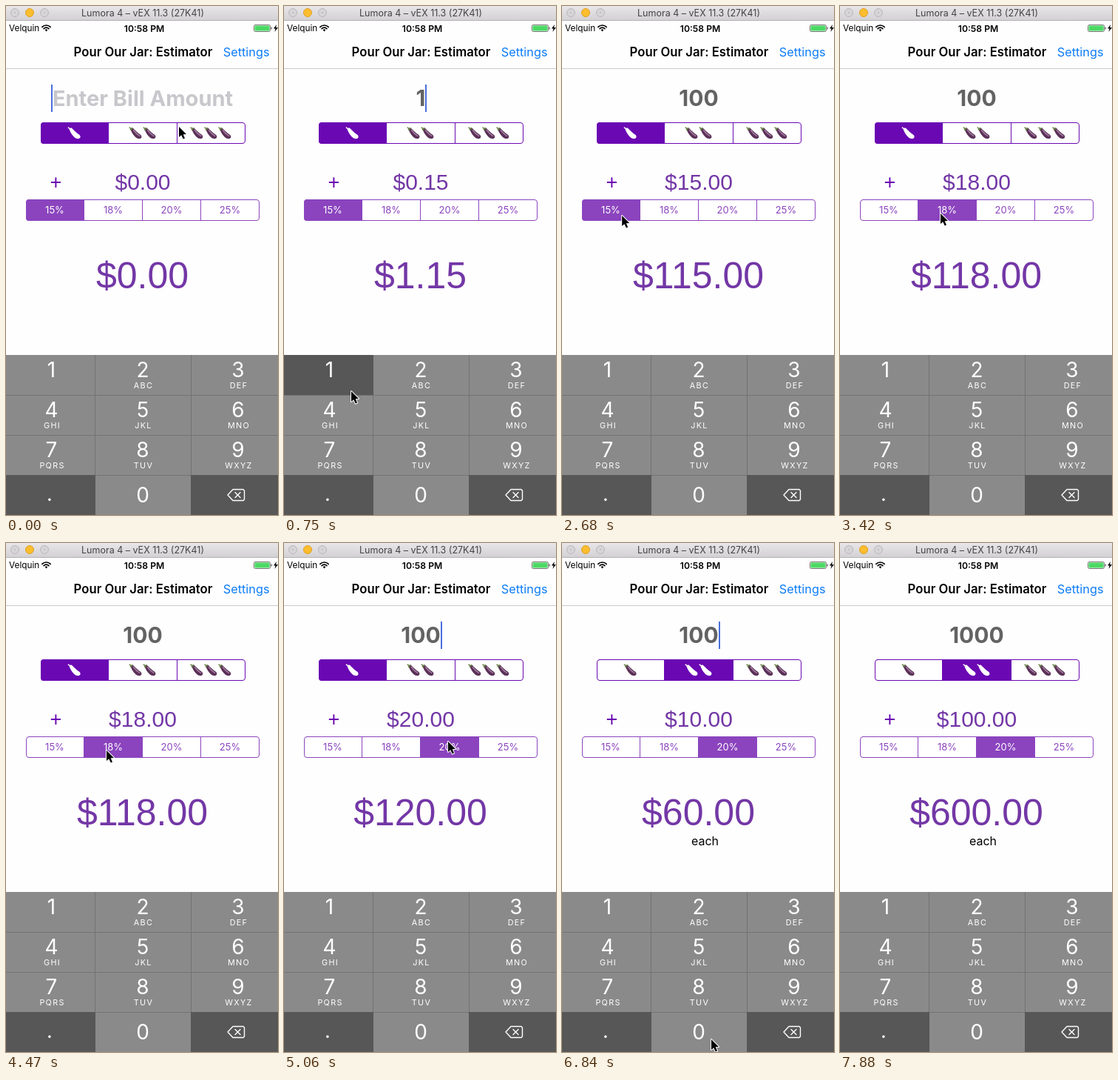
An HTML page with a canvas that plays this animation: 368 px wide and 687 px high, repeating every 8000 ms.

```html
<!DOCTYPE html>
<html lang="en">
<head>
<meta charset="utf-8">
<title>Tip calculator</title>
<style>
html, body { margin: 0; width: 100%; height: 100%; overflow: hidden; background: #fff; }
canvas { display: block; width: 368px; height: 687px; }
</style>
</head>
<body>
<canvas id="stage"></canvas>
<script>
const W = 368, H = 687, LOOP = 8000, STEP = 148.6;
const UI = 'Inter, "Open Sans", sans-serif';
const SANS = '"Liberation Sans", Arial, sans-serif';
const DEEP = '#6a08b3', VIOLET = '#8b44be', AMOUNT = '#7337a6';
const canvas = document.getElementById('stage');
const ctx = canvas.getContext('2d');
const dpr = window.devicePixelRatio || 1;
canvas.width = W * dpr;
canvas.height = H * dpr;

// Pointer stops: [tick, x, y]
const PATH = [
  [0, 234, 163], [4, 91, 520], [6, 91, 520], [8, 173, 664], [9, 175, 652],
  [11, 175, 652], [15, 59, 320], [17, 62, 284], [20, 136, 280], [30, 136, 280],
  [33, 222, 268], [35, 222, 268], [37, 188, 168], [42, 188, 168], [45, 202, 670]
];
const BILLS = [[0, 0], [5, 1], [9, 10], [10, 100], [47, 1000]];
const RATES = [15, 18, 20, 25];
const PRESSES = [[5, 5, '1'], [9, 10, '0'], [47, 48, '0']];

function latest(list, n) {
  let value = list[0][1];
  for (const [at, v] of list) if (n >= at) value = v;
  return value;
}

function pointerAt(n) {
  for (let i = 1; i < PATH.length; i++) {
    const [a, ax, ay] = PATH[i - 1], [b, bx, by] = PATH[i];
    if (n <= b) {
      const u = (n - a) / (b - a), e = u * u * (3 - 2 * u);
      return [ax + (bx - ax) * e, ay + (by - ay) * e];
    }
  }
  return PATH[PATH.length - 1].slice(1);
}

function caretOn(n) {
  if (n >= 52) return false;
  if (n < 14) return n < 2 || n > 3;
  if (n >= 47) return true;
  return (n - 22.3 + 65) % 6.5 >= 3.2;
}

function rect(x, y, w, h, color) {
  ctx.fillStyle = color;
  ctx.fillRect(x, y, w, h);
}

function text(s, x, y, size, color, weight = 400, family = UI, align = 'center') {
  ctx.font = `${weight} ${size}px ${family}`;
  ctx.textAlign = align;
  ctx.fillStyle = color;
  ctx.fillText(s, x, y);
}

function poly(points, close = true) {
  ctx.beginPath();
  points.forEach(([x, y], i) => i ? ctx.lineTo(x, y) : ctx.moveTo(x, y));
  if (close) ctx.closePath();
}

function at(x, y, draw) {
  ctx.save();
  ctx.translate(x, y);
  draw();
  ctx.restore();
}

function titleBar() {
  const g = ctx.createLinearGradient(0, 0, 0, 19);
  g.addColorStop(0, '#e8e6e8');
  g.addColorStop(1, '#d3d1d3');
  rect(0, 0, W, 19, g);
  rect(0, 19, W, 1, '#b4b2b4');
  [['#d7d5d7', '#b9b7b9'], ['#fcbd2e', '#dfa023'], ['#d7d5d7', '#b9b7b9']].forEach(([fill, edge], i) => {
    ctx.beginPath();
    ctx.arc(12 + i * 20, 9, 5.5, 0, 7);
    ctx.fillStyle = fill;
    ctx.fill();
    ctx.lineWidth = 1;
    ctx.strokeStyle = edge;
    ctx.stroke();
    if (i !== 1) rect(11 + i * 20, 8, 2, 2, '#c2c0c2');
  });
  text('Lumora 4 – vEX 11.3 (27K41)', 185, 14, 12.5, '#444');
}

function statusBar() {
  text('Velquin', 4, 34, 11.8, '#000', 400, UI, 'left');
  text('10:58 PM', 187, 34.5, 12.2, '#000', 600);
  ctx.strokeStyle = '#000';
  ctx.lineWidth = 1.7;
  for (const r of [8, 4.8]) {
    ctx.beginPath();
    ctx.arc(54.5, 34, r, -Math.PI * 0.75, -Math.PI * 0.25);
    ctx.stroke();
  }
  ctx.beginPath();
  ctx.moveTo(54.5, 34.5);
  ctx.arc(54.5, 34, 2.5, -Math.PI * 0.75, -Math.PI * 0.25);
  ctx.fillStyle = '#000';
  ctx.fill();

  ctx.lineWidth = 1;
  ctx.beginPath();
  ctx.roundRect(335.5, 25.5, 22, 9, 1.8);
  ctx.strokeStyle = '#777';
  ctx.stroke();
  rect(336.5, 26.5, 20, 7, '#4cd964');
  rect(358.5, 28.5, 1.5, 3, '#777');
  poly([[366, 25], [362, 30.6], [364.6, 30.6], [363.4, 35], [368, 29], [365.2, 29]]);
  ctx.fillStyle = '#000';
  ctx.fill();
}

function navBar() {
  rect(0, 20, W, 64, '#fefefe');
  rect(0, 84, W, 1, '#cbcbcb');
  statusBar();
  text('Pour Our Jar: Estimator', 185.5, 68, 16.7, '#000', 600);
  text('Settings', 356.5, 68, 16.3, '#0c7cf8', 400, UI, 'right');
}

function segments(x, y, w, h, count, chosen, color, label) {
  const cell = w / count;
  ctx.save();
  ctx.beginPath();
  ctx.roundRect(x, y, w, h, 4);
  ctx.clip();
  rect(x, y, w, h, '#fff');
  rect(Math.round(x + chosen * cell), y, Math.round(cell), h, color);
  for (let i = 1; i < count; i++) rect(Math.round(x + i * cell) - 1, y, 1, h, color);
  ctx.restore();
  ctx.beginPath();
  ctx.roundRect(x + 0.5, y + 0.5, w - 1, h - 1, 3.5);
  ctx.lineWidth = 1;
  ctx.strokeStyle = color;
  ctx.stroke();
  for (let i = 0; i < count; i++) label(i, x + (i + 0.5) * cell, i === chosen);
}

function eggplant(x, y, white) {
  at(x, y, () => {
    ctx.beginPath();
    ctx.moveTo(-6.4, -4.6);
    ctx.bezierCurveTo(-4.5, 0, -0.5, 7, 4.8, 7.6);
    ctx.bezierCurveTo(8.6, 8, 9.6, 4.2, 7, 2.2);
    ctx.bezierCurveTo(3, 0, 0, -4, -3, -6.6);
    ctx.bezierCurveTo(-5, -7.6, -6.8, -6.4, -6.4, -4.6);
    ctx.fillStyle = white ? '#fff' : '#5b3157';
    ctx.fill();
    ctx.lineCap = 'round';
    if (!white) {
      ctx.beginPath();
      ctx.moveTo(-2.5, -4);
      ctx.quadraticCurveTo(1, 1, 6, 4);
      ctx.lineWidth = 1.4;
      ctx.strokeStyle = '#a57fa2';
      ctx.stroke();
      poly([[-7, -6.6], [-3.4, -7.2], [-3.4, -5.2], [-4.8, -5.2], [-5.8, -3], [-7, -4.2]]);
      ctx.fillStyle = '#678044';
      ctx.fill();
    }
    poly([[-6, -6], [-7.8, -7.4]], false);
    ctx.lineWidth = 1.5;
    ctx.strokeStyle = white ? '#fff' : '#678044';
    ctx.stroke();
  });
}

function billField(bill, n) {
  if (bill) text(bill, 185, 135, 30, '#636363', 700);
  else text('Enter Bill Amount', 185, 135, 29, '#c7c7cc', 700);
  if (caretOn(n)) {
    const x = bill ? 185 + ctx.measureText(bill).width / 2 : 61;
    rect(Math.round(x), 106, 2, 37, '#4a6fdc');
  }
}

function deleteIcon() {
  ctx.strokeStyle = '#fff';
  ctx.lineWidth = 1.4;
  ctx.lineJoin = ctx.lineCap = 'round';
  poly([[300, 660], [307, 652.5], [321, 652.5], [322.5, 654], [322.5, 666], [321, 667.5], [307, 667.5]]);
  ctx.stroke();
  poly([[310, 656.5], [317, 663.5]], false);
  ctx.stroke();
  poly([[317, 656.5], [310, 663.5]], false);
  ctx.stroke();
}

function keypad(n) {
  const keys = '1 2 3 4 5 6 7 8 9 . 0 <'.split(' ');
  const letters = ['', 'ABC', 'DEF', 'GHI', 'JKL', 'MNO', 'PQRS', 'TUV', 'WXYZ'];
  const edges = [0, 120, 250, W], mids = [61.5, 185, 314];
  const press = PRESSES.find(([a, b]) => n >= a && n <= b);
  rect(0, 471, W, 216, '#8a8a8a');
  for (const x of [120, 250]) rect(x, 471, 1, 216, '#737373');
  for (const y of [525, 579, 633]) rect(0, y, W, 1, '#737373');
  keys.forEach((key, i) => {
    const c = i % 3, x = mids[c], y = 471 + Math.floor(i / 3) * 54;
    if (key === '.' || key === '<' || (press && press[2] === key)) {
      rect(edges[c], y, edges[c + 1] - edges[c] + (c ? 0 : 1), 54, '#575757');
    }
    if (key === '<') deleteIcon();
    else if (key === '.') text('.', 59, 668, 27, '#fff');
    else text(key, x, key === '0' ? 670 : y + 30, 28, '#fff', 400);
    if (letters[i]) {
      ctx.letterSpacing = '1.3px';
      text(letters[i], x + 1, y + 45, 10.8, '#fff');
      ctx.letterSpacing = '0px';
    }
  });
}

function pointer(x, y) {
  at(x, y, () => {
    poly([[0, 0], [0, 14], [3.2, 11.2], [5.7, 16.6], [8, 15.6], [5.7, 10.3], [10, 10]]);
    ctx.lineJoin = 'round';
    ctx.lineWidth = 2;
    ctx.strokeStyle = '#fff';
    ctx.stroke();
    ctx.fillStyle = '#000';
    ctx.fill();
  });
}

function draw(t) {
  const n = Math.floor(t / STEP);
  const bill = latest(BILLS, n);
  const rate = n >= 33 ? 2 : n >= 21 ? 1 : 0;
  const people = n >= 38 ? 2 : 1;
  const tip = bill * RATES[rate] / 100;
  const money = v => '$' + (v / people).toFixed(2);

  ctx.setTransform(dpr, 0, 0, dpr, 0, 0);
  rect(0, 0, W, H, '#fefefe');
  titleBar();
  navBar();
  billField(bill, n);
  segments(47, 157, 277, 29, 3, people - 1, DEEP, (i, x, on) => {
    for (let k = 0; k <= i; k++) eggplant(x - 1 + (k - i / 2) * 19, 171.5, on);
  });
  text('+', 67.5, 247, 27, DEEP, 400, SANS);
  text(money(tip), 185, 247.5, 30, AMOUNT, 400, SANS);
  segments(27, 261, 316, 29, 4, rate, VIOLET, (i, x, on) => {
    text(RATES[i] + '%', x - 0.5, 280, 13, on ? '#fff' : VIOLET);
  });
  text(money(bill + tip), 184.5, 381, 50, AMOUNT, 400, SANS);
  if (people > 1) text('each', 193.5, 408, 16, '#000');
  keypad(n);
  if (n < 53) pointer(...pointerAt(n));
}

const start = performance.now();
function frame() {
  draw((performance.now() - start) % LOOP);
  requestAnimationFrame(frame);
}
frame();
</script>
</body>
</html>
```
